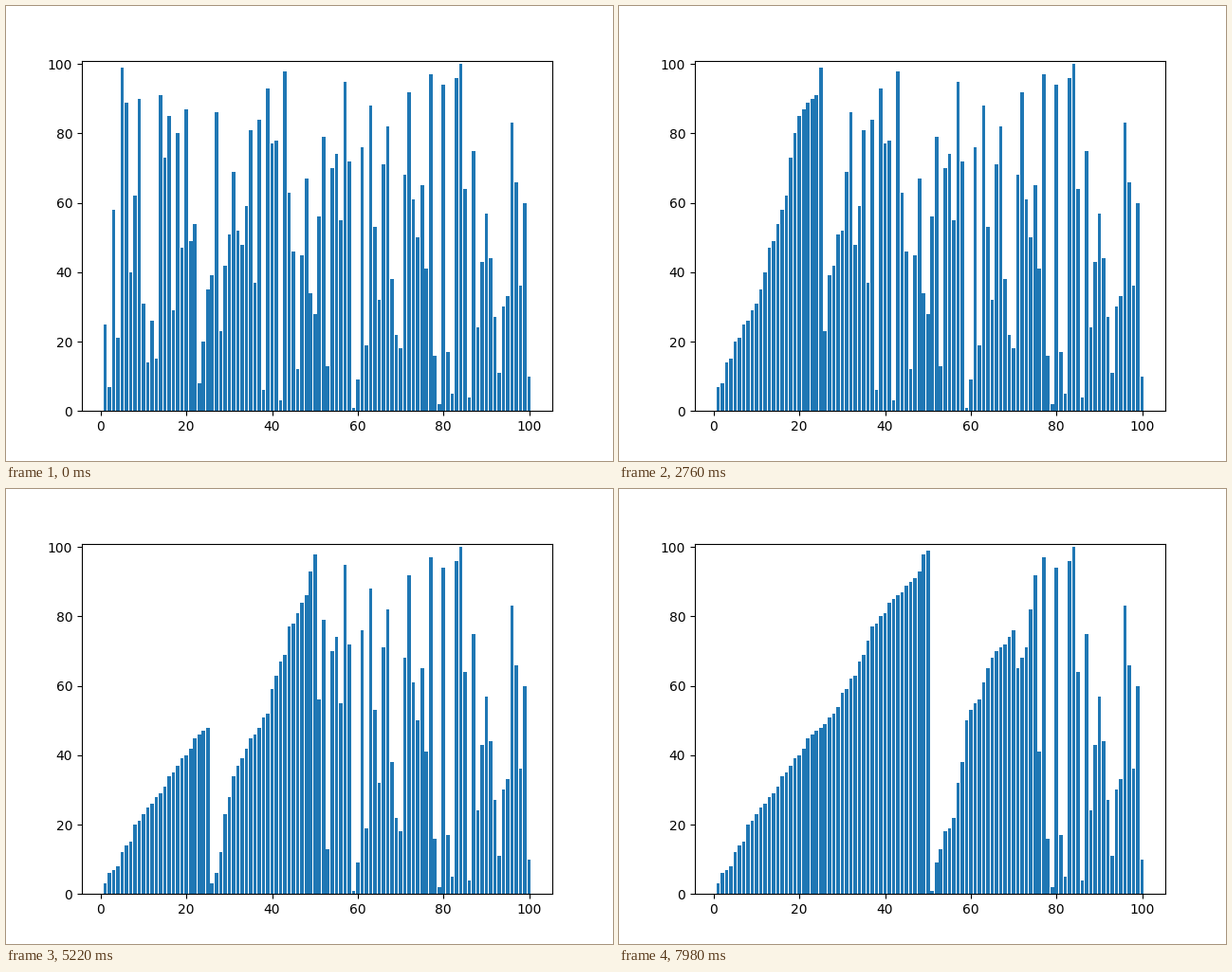
A matplotlib script that plays this animation: 640x480 px, repeating every 8 s.

```python
import matplotlib.pyplot as plt
from matplotlib.animation import FuncAnimation

FRAMES = 400
INTERVAL = 20  # ms

VALUES = [
    25, 7, 58, 21, 99, 89, 40, 62, 90, 31, 14, 26, 15, 91, 73, 85, 29, 80, 47, 87,
    49, 54, 8, 20, 35, 39, 86, 23, 42, 51, 69, 52, 48, 59, 81, 37, 84, 6, 93, 77,
    78, 3, 98, 63, 46, 12, 45, 67, 34, 28, 56, 79, 13, 70, 74, 55, 95, 72, 1, 9,
    76, 19, 88, 53, 32, 71, 82, 38, 22, 18, 68, 92, 61, 50, 65, 41, 97, 16, 2, 94,
    17, 5, 96, 100, 64, 4, 75, 24, 43, 57, 44, 27, 11, 30, 33, 83, 66, 36, 60, 10,
]


def merge_sort(items, lo, hi):
    """Sort items[lo..hi] in place, yielding a snapshot after every write."""
    if lo >= hi:
        return
    mid = (lo + hi) // 2
    yield from merge_sort(items, lo, mid)
    yield from merge_sort(items, mid + 1, hi)
    merged = sorted(items[lo:hi + 1])
    for k, value in enumerate(merged, lo):
        items[k] = value
        yield list(items)


steps = [VALUES, *merge_sort(list(VALUES), 0, len(VALUES) - 1)]

fig, ax = plt.subplots(figsize=(6.4, 4.8), dpi=100)
bars = ax.bar(range(1, len(VALUES) + 1), VALUES, color="#1f77b4")
ax.set_ylim(0, 101)


def update(frame):
    for bar, height in zip(bars, steps[frame]):
        bar.set_height(height)
    return bars.patches


anim = FuncAnimation(fig, update, frames=FRAMES, interval=INTERVAL, repeat=True)
plt.show()
```
